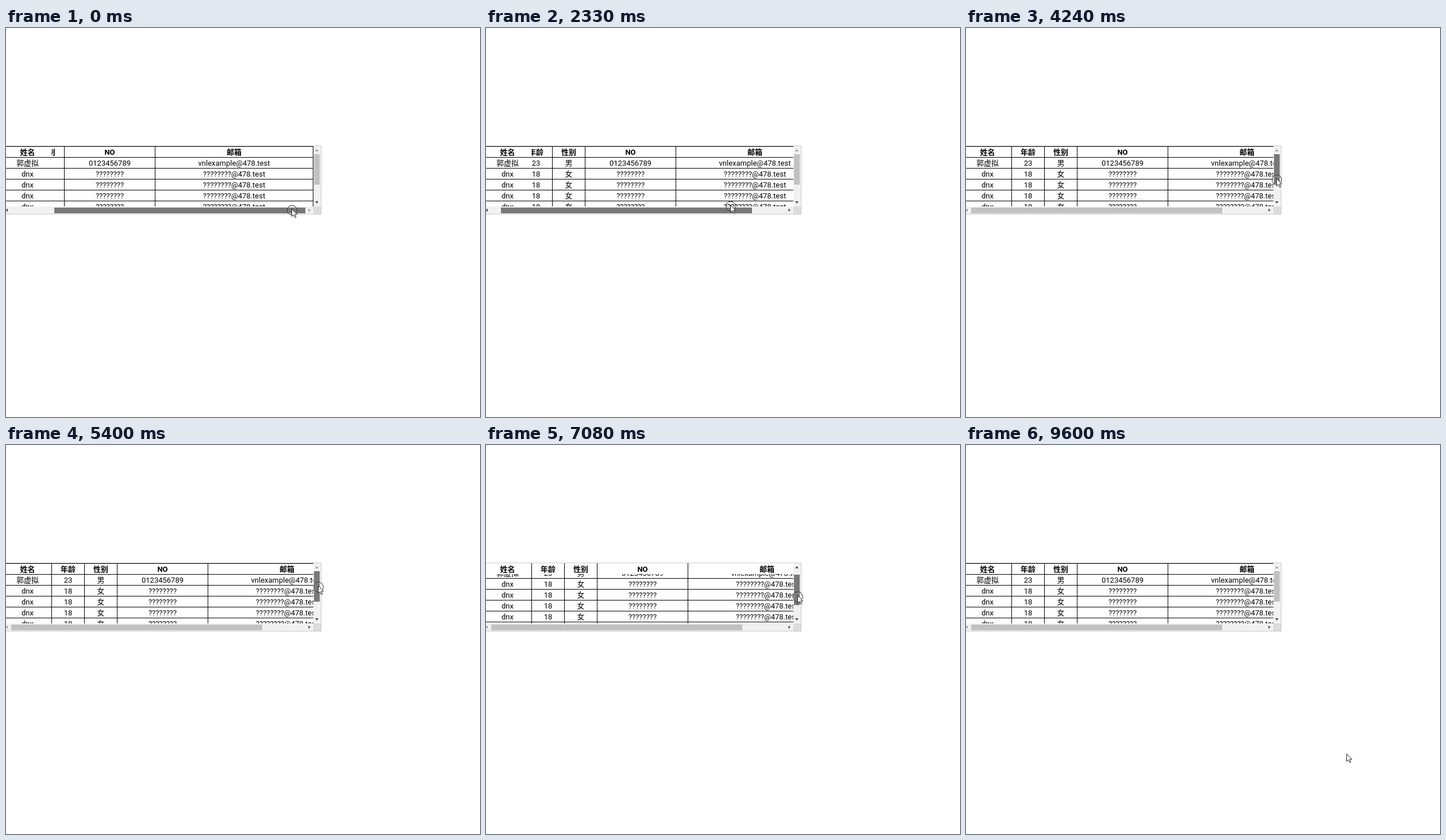
An HTML page for the animation above (9700 ms loop, 825x678 px).

```html
<!DOCTYPE html>
<html lang="zh">
<head>
<meta charset="utf-8">
<title>Sticky table</title>
<style>
  html, body { margin: 0; width: 100%; height: 100%; overflow: hidden; background: #fff; }
  svg { display: block; }
  text { font: 13px Roboto, "Noto Sans CJK SC", "Noto Sans CJK JP", sans-serif; text-anchor: middle; }
  .head { font-weight: 700; }
  .cell, .cursor { fill: #fff; }
  .track { fill: #f1f1f1; }
  .edge { fill: #ccc; }
</style>
</head>
<body>
<svg width="825" height="678" viewBox="0 0 825 678">
  <clipPath id="view"><rect y="206" width="535" height="105"/></clipPath>
  <rect class="edge" y="205" width="549" height="120"/>
  <rect class="cell" y="206" width="535" height="105"/>
  <g clip-path="url(#view)">
    <g id="lines"></g>
    <g id="body"></g>
    <g id="names"></g>
    <g id="head"></g>
    <g id="corner"></g>
  </g>
  <rect class="track" x="535" y="206" width="13" height="105"/>
  <rect class="track" y="311" width="535" height="13"/>
  <rect x="535" y="311" width="13" height="13" fill="#dcdcdc"/>
  <rect id="thumbX" y="313" width="437" height="10"/>
  <rect id="thumbY" x="536" width="10" height="53"/>
  <path id="up" d="M541 211l3 4h-6z"/>
  <path id="down" d="M541 306l3-4h-6z"/>
  <path id="left" d="M-.5 317.5l3.5-3v6z"/>
  <path id="right" d="M530 317.5l-3.5-3v6z"/>
  <g id="pointer">
    <g id="ring" fill="none">
      <circle cx="1" cy="2.5" r="7.3" stroke="#fff" stroke-opacity=".4"/>
      <circle cx="1" cy="2.5" r="8.3" stroke="#222"/>
    </g>
    <path class="cursor" d="M.5 .5V13.5L3.5 10.7 5.8 15.5 7.8 14.6 5.6 9.9H9.7Z" stroke="#222"/>
  </g>
</svg>
<script>
const LOOP = 9700, LAG = 36;
const TOP = 206, ROW = 19, ROWS = 8;
const MAX_X = 92, TRAVEL_X = 75, GRAB_X = 419;
const MAX_Y = 48, TRAVEL_Y = 24, GRAB_Y = 265.5;
const RELEASE_X = 3640, PRESS_Y = 4200, RELEASE_Y = 7500;

const edges = [-5, 79, 136, 193, 351, 626];
const titles = ['姓名', '年龄', '性别', 'NO', '邮箱'];
const first = ['郭虚拟', '23', '男', '0123456789', 'vnlexample@478.test'];
const other = ['dnx', '18', '女', '????????', '????????@478.test'];

const LEFT = [403, 306], RIGHT = [497, 315];
const GRIP = [540, 262], UP = [543, 245], DOWN = [543, 299];

const $ = id => document.getElementById(id);
const clamp = (v, max) => Math.max(0, Math.min(max, v));
const ease = k => (1 - Math.cos(Math.PI * k)) / 2;

// visits the points one after another in equal shares of the time span
const moves = [];
function sweep(start, end, ...points) {
  const duration = (end - start) / points.length;
  points.forEach((to, i) => moves.push({ start: start + i * duration, duration, to }));
}

// drag the horizontal bar
sweep(180, 900, LEFT);
sweep(1140, 1880, RIGHT);
sweep(2020, 2480, LEFT);
sweep(2730, RELEASE_X, RIGHT, LEFT);
// drag the vertical bar
sweep(3720, PRESS_Y, GRIP);
sweep(4240, 4680, DOWN);
sweep(4710, 5370, UP);
sweep(5420, 6670, DOWN, UP, DOWN);
sweep(6700, 6780, [541, 290]);
sweep(6930, 7190, UP);
// wander off
sweep(7460, 8420, [714, 330], [425, 405], [491, 416]);
sweep(8450, 8630, [533, 403]);
sweep(9350, 9600, [662, 538]);

function pointerAt(t) {
  return moves.reduce((point, { start, duration, to }) => {
    const k = ease(clamp((t - start) / duration, 1));
    return point.map((v, i) => v + (to[i] - v) * k);
  }, RIGHT);
}

function add(parent, tag, attrs, text = '') {
  const el = document.createElementNS('http://www.w3.org/2000/svg', tag);
  for (const key in attrs) el.setAttribute(key, attrs[key]);
  el.textContent = text;
  $(parent).append(el);
}

function addCell(parent, col, row, text) {
  const x = edges[col] + 1, y = TOP + row * ROW;
  const width = edges[col + 1] - x;
  add(parent, 'rect', { class: 'cell', x, y: y + 1, width, height: ROW - 1 });
  add(parent, 'text', { class: row ? '' : 'head', x: x + width / 2, y: y + 15 }, text);
}

function build() {
  for (let row = 0; row <= ROWS; row++)
    add('lines', 'rect', { x: -5, y: TOP + row * ROW, width: 632, height: 1 });
  for (const x of edges)
    add('lines', 'rect', { x, y: TOP, width: 1, height: ROWS * ROW + 1 });
  for (let row = 0; row < ROWS; row++) {
    const values = [titles, first][row] || other;
    values.forEach((text, col) => {
      const layer = row ? (col ? 'body' : 'names') : (col ? 'head' : 'corner');
      addCell(layer, col, row, text);
    });
  }
}

const move = (id, x, y) => $(id).setAttribute('transform', `translate(${x} ${y})`);
const paint = (id, color) => $(id).setAttribute('fill', color);
const thumbColor = active => active ? '#787878' : '#c1c1c1';
const arrowColor = enabled => enabled ? '#505050' : '#a3a3a3';

function draw(t) {
  const [x, y] = pointerAt(t).map(Math.round);
  // the page follows the pointer slightly late
  const [dragX, dragY] = pointerAt(t - LAG);
  const pressedX = t < RELEASE_X;
  const pressedY = t >= PRESS_Y && t < RELEASE_Y;
  const thumbX = pressedX ? clamp(dragX - GRAB_X, TRAVEL_X) : 0;
  const thumbY = pressedY ? clamp(dragY - GRAB_Y, TRAVEL_Y) : 0;
  const scrollX = Math.round(thumbX / TRAVEL_X * MAX_X);
  const scrollY = Math.round(thumbY / TRAVEL_Y * MAX_Y);

  move('lines', -scrollX, -scrollY);
  move('body', -scrollX, -scrollY);
  move('names', 0, -scrollY);
  move('head', -scrollX, 0);
  move('thumbX', 9 + Math.round(thumbX), 0);
  move('thumbY', 0, 220 + Math.round(thumbY));
  move('pointer', x, y);

  paint('thumbX', thumbColor(pressedX));
  paint('thumbY', thumbColor(pressedY));
  paint('left', arrowColor(scrollX > 0));
  paint('right', arrowColor(scrollX < MAX_X));
  paint('up', arrowColor(scrollY > 0));
  paint('down', arrowColor(scrollY < MAX_Y));
  $('ring').setAttribute('visibility', pressedX || pressedY ? 'visible' : 'hidden');
}

function tick() {
  draw(performance.now() % LOOP);
  requestAnimationFrame(tick);
}

build();
tick();
</script>
</body>
</html>
```
